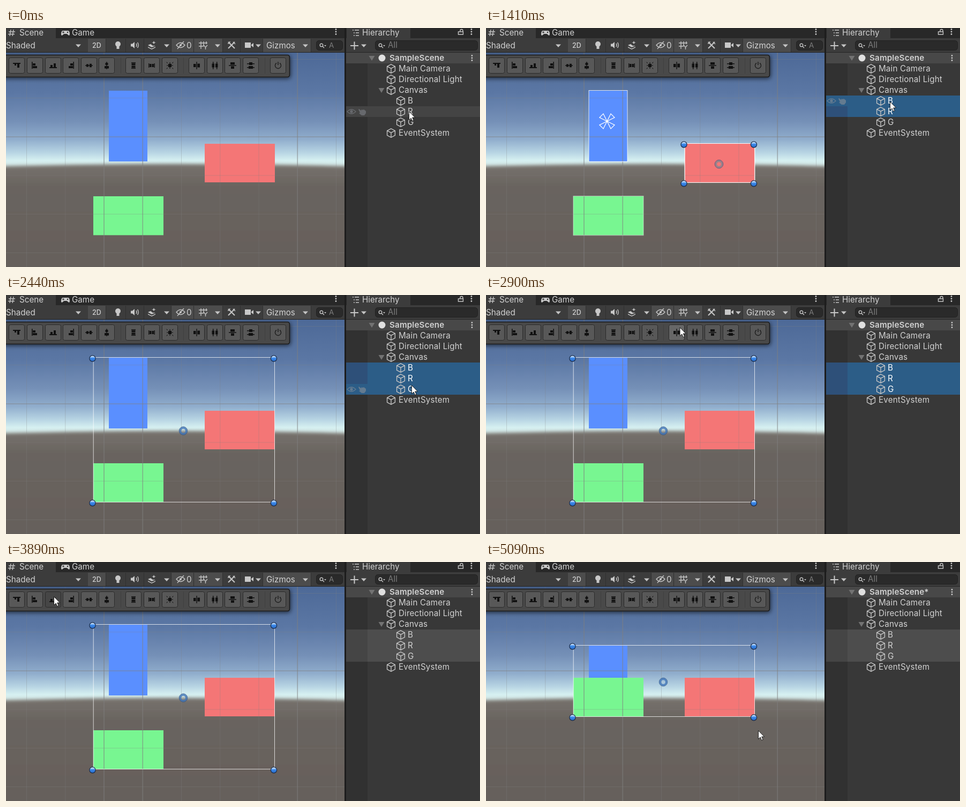
An HTML page for the animation above (5120 ms loop, 885 px wide and 446 px high).

```html
<!DOCTYPE html>
<html lang="en">
<head>
<meta charset="utf-8">
<title>Align objects</title>
<style>
html, body { margin: 0; width: 100%; height: 100%; overflow: hidden; background: #383838; }
svg { display: block; width: 885px; height: 446px; }
text { font: 15.2px Inter, sans-serif; fill: #d2d2d2; white-space: pre; }
.row { letter-spacing: .15px; }
.bold { font-weight: 600; }
.small { font-size: 12.5px; font-weight: 500; }
.dim { fill: #7c7c7c; }
.line { fill: none; stroke: #c4c4c4; stroke-width: 1.4; }
.fill { fill: #c8c8c8; }
</style>
</head>
<body>
<svg id="stage" viewBox="0 0 885 446" xmlns="http://www.w3.org/2000/svg"></svg>
<script>
const LOOP = 5120;
const stage = document.getElementById('stage');

const rect = (x, y, w, h, fill, extra = '') =>
  `<rect x="${x}" y="${y}" width="${w}" height="${h}" fill="${fill}" ${extra}/>`;
const label = (x, y, s, extra = '') => `<text x="${x}" y="${y}" ${extra}>${s}</text>`;
const path = (d, extra = 'class="line"') => `<path d="${d}" ${extra}/>`;
const at = (x, y, body, extra = '') => `<g transform="translate(${x} ${y})" ${extra}>${body}</g>`;
const stops = list => list.map(([o, c]) => `<stop offset="${o}" stop-color="${c}"/>`).join('');

const cube = (x, y) => at(x, y, path('M0-8.2 7.4-4.4V4.4L0 8.2-7.4 4.4V-4.4ZM-7.4-4.4 0-.6 7.4-4.4M0-.6V8.2'));
const arrow = (x, y) => path(`M${x - 5} ${y - 2.5}h10l-5 5.5z`, 'fill="#c4c4c4"');
const foldout = (x, y) => path(`M${x - 5.5} ${y - 4.5}h11l-5.5 9z`, 'fill="#737373"');
const dots = (x, y) => [-4.5, 0, 4.5].map(d => `<circle class="fill" cx="${x}" cy="${y + d}" r="1.4"/>`).join('');
const lens = (x, y) => at(x, y, `<circle class="line" cx="-1" cy="-1" r="2.8"/>` +
  path('M1 1 4 4.2') + path('M4-1h4l-2 2.4z', 'class="fill"'));
const menu = (x, y) => path(`M${x} ${y - 5}h2m2 0h8M${x + 2} ${y}h2m2 0h6M${x + 2} ${y + 5}h2m2 0h6`);

const items = [
  { id: 'B', y: 136, color: '#5a8fff', x: 192, top: 117, w: 72, h: 132, aligned: 156 },
  { id: 'R', y: 156, color: '#f47676', x: 371, top: 216, w: 131, h: 72, aligned: 216 },
  { id: 'G', y: 176, color: '#78f691', x: 163, top: 314, w: 131, h: 72.6, aligned: 216 }
];

function grid() {
  let out = '';
  for (let i = 0; i < 9; i++) {
    const strong = i === 2 || i === 3 || i === 7;
    out += rect(38 + i * 72.25 - (strong ? .3 : 0), 46, strong ? 1.6 : 1, 400, '#808080', `opacity="${strong ? .58 : .3}"`);
  }
  for (let i = 0; i < 6; i++)
    out += rect(0, 58 + i * 72.2, 632, i === 2 ? 1.5 : 1, '#808080', `opacity="${i === 2 ? .55 : .32}"`);
  return out;
}

const tools = [
  [20, 'M-7-5H7v2H-7zM-4-3h3v3h-3zM1-3h4v7h-4z'],
  [54, 'M-6-7h1.6V6h-1.6zM-4-4h5v4h-5zM-4 1h8v4h-8z'],
  [88, 'M-7 3H7v2H-7zM-5-1h4v4h-4zM1-4h4v7h-4z'],
  [121, 'M4.4-7H6V6H4.4zM-1-4h5v4h-5zM-4 1h8v4h-8z'],
  [155, 'M-7-.7H7v1.4H-7zM-5-2.5h4v5h-4zM1-3.2h4v6.4h-4z'],
  [188, 'M-.7-7h1.4V7h-1.4zM-2.5-5h5v4h-5zM-4 1h8v4.5h-8z'],
  [238, 'M-4-6h8v1.4h-8zM-3.5-4h7v3.5h-7zM-3.5.5h7v3.5h-7zM-4 4.6h8V6h-8z'],
  [272, 'M-6-4h1.4v8h-1.4zM-4-3h3.5v6h-3.5zM.5-3h3.5v6h-3.5zM4.6-4H6v8H4.6z'],
  [306, 'M-3-3h6v6h-6zM-7-7l3 2-1 1zM7-7l-3 2 1 1zM-7 7l3-2-1-1zM7 7l-3-2 1-1zM-6-.6h3v1.2h-3zM3-.6h3v1.2h-3zM-.6-6h1.2v3h-1.2zM-.6 3h1.2v3h-1.2z'],
  [356, 'M-.7-7h1.4V7h-1.4zM-6-3h4.5v6h-4.5zM1.5-3.5h4.5v7h-4.5z'],
  [390, 'M-4-7h1.4V7h-1.4zM3-7h1.4V7h-1.4zM-5.5-3.5h4.5v7h-4.5zM1-3.5h4.5v7h-4.5z'],
  [423, 'M-7-.7H7v1.4H-7zM-4-6h8v4.5h-8zM-3 1.5h6v4.5h-6z'],
  [457, 'M-7-4H7v1.4H-7zM-7 3H7v1.4H-7zM-3-6h6v5h-6zM-4 1h8v5h-8z'],
  [508, '']
];

function toolBar() {
  const buttons = tools.map(([x, d]) => at(x, 70,
    rect(-14.5, -14.5, 29, 29, '#585858', 'class="tool" rx="3" stroke="#2b2b2b"') + (d
      ? path(d, 'fill="#111"')
      : path('M-3-4.6A5.5 5.5 0 1 0 3-4.6M0-7V-1', 'fill="none" stroke="#1c1c1c" stroke-width="1.4"'))));
  return rect(-8, 50.5, 537.5, 41, '#484848', 'rx="4" stroke="#1b1b1b" stroke-width="1.6" filter="url(#shadow)"') +
    [214, 331, 483].map(x => rect(x, 55, 1, 30, '#404040')).join('') + buttons.join('');
}

function sceneHeader() {
  const cells = [[153, 33, 1], [187, 36], [224, 33], [258, 50], [309, 41, 1], [351, 53, 1], [405, 32], [438, 41], [480, 89, 1]];
  return rect(0, 0, 633, 19, '#282828') + rect(0, 0, 93, 20, '#3c3c3c') + rect(0, 19, 633, 27, '#3c3c3c') +
    cells.map(([x, w, on]) => rect(x, 20, w, 25, on ? '#4c4c4c' : '#3c3c3c') + rect(x + w, 20, 1, 25, '#303030')).join('') +
    rect(0, 45, 633, 1, '#222') +
    path('M9 3 7 15M14 3 12 15M5 7h12M4 11.5h12') + label(25, 14, 'Scene') +
    at(111, 9, path('M-5-4H5C8-4 9 4 7 5 5 5 4 2 2 2H-2C-4 2-5 5-7 5-9 4-8-4-5-4Z', 'class="fill"') +
      path('M-6-1h4M-4-3v4', 'stroke="#282828"') + `<circle cx="4" cy="-1" r="1.2" fill="#282828"/>`) +
    label(123, 14, 'Game') + dots(616, 7) +
    label(0, 38, 'Shaded') + arrow(135, 33) + label(161, 37, '2D', 'class="small"') +
    at(209, 32, `<circle class="fill" cy="-2" r="5"/>` + path('M-2.5 2h5v5h-5z', 'class="fill"')) +
    at(240, 32, path('M-7-2.5h3L0-6V6L-4 2.5h-3z', 'class="fill"') + path('M3-3Q5 0 3 3M5.5-5Q9 0 5.5 5')) +
    at(272, 32, path('M-7 0-2-2 2 1 7 1 0 4zM-7 3 0 6.5 7 3V4.5L0 8-7 4.5zM4-8l1 2.5 3 .5-3 1-1 2.5-1-2.5-3-1 3-.5z', 'class="fill"')) +
    arrow(300, 33) +
    at(326, 32, path('M-8 0Q0-9 8 0 0 9-8 0ZM-6 7 6-7') + `<circle class="fill" r="2"/>`) + label(337, 38, '0') +
    at(368, 32, path('M-8-4H8M-8 2H1M-4-7V7M1-7V2M6-7V-2') + path('M1 0 4.5 4 8 0M4.5 4v4', 'class="line" stroke-width="2"')) + arrow(395, 33) +
    at(421, 32, path('M-6 6 6-6M-6-6 6 6', 'class="line" style="stroke-width:2.2"') + path('M-7-3Q-3-3-3-7M3-6 7-2')) +
    at(454, 32, path('M-8-5H3V5H-8zM4-1 8-4V4L4 1z', 'class="fill"')) + arrow(471, 33) +
    label(486, 38, 'Gizmos') + arrow(559, 33) +
    rect(579.5, 23.5, 49, 18, '#2a2a2a', 'rx="5" stroke="#212121"') + lens(590, 33) + label(603, 37, 'A', 'class="dim" style="font-size:13.5px"');
}

function hierarchy() {
  return rect(632, 0, 4, 446, '#1d1d1d') + rect(635, 0, 250, 19, '#282828') + rect(636, 0, 119, 20, '#3c3c3c') +
    rect(635, 19, 250, 27, '#3c3c3c') + rect(635, 45, 250, 1, '#252525') +
    menu(647, 9) + label(665, 14, 'Hierarchy') +
    at(849, 8, path('M-4.5-1h9V4h-9zM-1-1V-3A2.5 2.5 0 0 1 4-3V-1')) + dots(869, 7) +
    path('M643 33h15M650.5 25.5v15', 'stroke="#c8c8c8" stroke-width="2"') + arrow(668, 33) +
    rect(689.5, 23.5, 191, 18, '#2a2a2a', 'rx="5" stroke="#212121"') + lens(700, 33) + label(713, 37, 'All', 'class="dim"') +
    rect(635, 46, 250, 400, '#383838') + rect(635, 46, 40, 400, '#313131') + rect(635, 46, 250, 20, '#484848') +
    items.map(o => rect(635, o.y - 10, 250, 20, '#444', `id="row${o.id}"`) + rect(635, o.y - 10, 40, 20, '#2e5079', `id="side${o.id}"`)).join('') +
    `<g id="eye">${path('M637 0Q645-8 653 0 645 8 637 0Z', 'fill="none" stroke="#8a8f96" stroke-width="1.4"')}` +
    `<circle cx="645" r="2.7" fill="#8a8f96"/>` +
    path('M659-5l4 3 1-2 2 1 2-1 4 3v4l-3 4h-5l-5-4 2-1-3-6z', 'fill="#8a8f96"') + '</g>' +
    foldout(683, 56.5) + `<circle cx="702" cy="56" r="6.5" fill="#e0e0e0"/>` +
    label(716, 61, 'SampleScene', 'id="title" class="row bold"') + dots(870, 56) + foldout(701, 116.5) +
    [['Main Camera', 76], ['Directional Light', 96], ['Canvas', 116], ['EventSystem', 196]]
      .map(([s, y]) => cube(719, y) + label(733, y + 5, s, 'class="row"')).join('') +
    items.map(o => cube(737, o.y) + label(750, o.y + 5, o.id, `id="name${o.id}"`)).join('');
}

stage.innerHTML = `<defs>
  <linearGradient id="sky" gradientUnits="userSpaceOnUse" x1="0" y1="46" x2="0" y2="260">${stops([
    [0, '#4d6997'], [.35, '#5b77a4'], [.6, '#7590b7'], [.76, '#91aecd'], [.87, '#b7d4e3'], [.94, '#d6f0f1'], [1, '#d4e6e4']])}</linearGradient>
  <linearGradient id="ground" x1="0" y1="0" x2="0" y2="1">${stops([[0, '#77726d'], [.2, '#69645f'], [1, '#655f5a']])}</linearGradient>
  <linearGradient id="knob" x1="0" y1="0" x2="0" y2="1">${stops([[0, '#e4f1ff'], [.3, '#93c0f5'], [.4, '#3f8cec'], [1, '#2468c8']])}</linearGradient>
  <filter id="soft" x="-5%" y="-10%" width="110%" height="120%"><feGaussianBlur stdDeviation="3"/></filter>
  <filter id="shadow" x="-5%" y="-50%" width="110%" height="200%"><feDropShadow dx="1" dy="2" stdDeviation="4" flood-opacity=".65"/></filter>
  <clipPath id="view"><rect y="46" width="632" height="400"/></clipPath>
</defs>
<g clip-path="url(#view)">
  ${rect(0, 46, 632, 220, 'url(#sky)')}
  ${path('M-20 258.5Q316 249 652 258.5V470H-20Z', 'fill="url(#ground)" filter="url(#soft)"')}
  ${items.map(o => rect(o.x, o.top, o.w, o.h, o.color, `id="box${o.id}"`)).join('')}
  ${grid()}
  <g id="single" fill="none" stroke="#fff">
    ${items.map(o => `<rect x="${o.x}" y="${o.top - .5}" width="${o.w}" height="${o.h + .8}" opacity="${o.id === 'G' ? .5 : .8}"/>`).join('')}
    ${at(226, 174, [[1, 1], [-1, 1], [1, -1], [-1, -1]].map(([a, b]) =>
      path(`M0 0 ${14 * a} ${7 * b} ${7 * a} ${14 * b}Z`, 'stroke-width="1.3"')).join(''))}
  </g>
  <g id="gizmo">
    <rect id="bounds" fill="none" stroke="#fff" stroke-opacity=".75"/>
    <g id="pivot" fill="none"><circle id="ring" r="5.6" stroke-width="3.6" opacity=".8"/><circle r="7.8" stroke="#2d5285" opacity=".7"/></g>
    ${'<circle class="knob" r="5.6" fill="url(#knob)" stroke="#1c2c48" stroke-width="1.2"/>'.repeat(4)}
  </g>
  ${toolBar()}
</g>
${sceneHeader()}${hierarchy()}
<path id="cursor" d="M.5.7V16.4L4.2 13 6.6 18.6 9.1 17.5 6.7 12H11.6Z" fill="#fff" stroke="#111" stroke-width=".9"/>`;

const $ = id => document.getElementById(id);
const knobs = [...document.querySelectorAll('.knob')];
const toolRects = [...document.querySelectorAll('.tool')];
const show = (el, on) => el.setAttribute('display', on ? 'inline' : 'none');
const set = (el, attrs) => { for (const k in attrs) el.setAttribute(k, attrs[k]); };

// start, end, target x, y, optional control point
const moves = [
  [890, 970, 754, 137],
  [1580, 1750, 757, 164],
  [2040, 2150, 757, 168],
  [2600, 3120, 116, 68, 437, 20],
  [3150, 3350, 89, 64],
  [4760, 5090, 508, 314]
];

function pointer(t) {
  let x = 752, y = 155;
  for (const [a, b, tx, ty, cx = (x + tx) / 2, cy = (y + ty) / 2] of moves) {
    if (t < a) break;
    const p = Math.min(1, (t - a) / (b - a)), s = p * p * (3 - 2 * p);
    const mix = (u, c, v) => u * (1 - s) ** 2 + 2 * c * s * (1 - s) + v * s * s;
    x = mix(x, cx, tx);
    y = mix(y, cy, ty);
  }
  return [x, y];
}

const selection = t => t < 560 ? '' : t < 1410 ? 'R' : t < 2310 ? 'BR' : 'BRG';

function drawGizmo(t, aligned) {
  const ids = selection(t - 60);
  show($('gizmo'), ids);
  show($('single'), ids === 'R');
  if (!ids) return;
  const picked = items.filter(o => ids.includes(o.id));
  const topOf = o => aligned ? o.aligned : o.top;
  const x0 = Math.min(...picked.map(o => o.x)), x1 = Math.max(...picked.map(o => o.x + o.w));
  const y0 = Math.min(...picked.map(topOf)), y1 = Math.floor(Math.max(...picked.map(o => topOf(o) + o.h)));
  set($('bounds'), { x: x0 + .2, y: y0 - .5, width: x1 - x0 - .7, height: y1 - y0 + 1 });
  set($('pivot'), { transform: `translate(${(x0 + x1) / 2 - 1.5} ${(y0 + y1) / 2 + 2})` });
  set($('ring'), { stroke: ids === 'R' ? '#85858e' : '#3f74b8' });
  knobs.forEach((k, i) => set(k, { cx: i % 2 ? x1 - 2 : x0 - 1.5, cy: i < 2 ? y0 + 1.5 : y1 + 2.3 }));
}

function draw(t) {
  const [x, y] = pointer(t);
  const ids = selection(t), focused = t < 3890, aligned = t >= 4060;
  let hovered = null;
  for (const o of items) {
    const on = ids.includes(o.id), over = x > 635 && Math.abs(y - o.y) < 10;
    if (over) hovered = o;
    show($('row' + o.id), on || over);
    show($('side' + o.id), on && !over);
    set($('row' + o.id), { fill: !on ? '#444' : focused ? '#2c5d87' : '#4d4d4d' });
    set($('side' + o.id), { fill: focused ? '#2e5079' : '#454545' });
    $('name' + o.id).style.fill = on && focused ? '#fff' : '#d2d2d2';
    set($('box' + o.id), { y: aligned ? o.aligned : o.top });
  }
  show($('eye'), hovered);
  if (hovered) set($('eye'), { transform: `translate(0 ${hovered.y})`, opacity: ids.includes(hovered.id) ? .6 : .5 });
  toolRects.forEach((r, i) => {
    const over = Math.abs(x - tools[i][0]) < 15 && Math.abs(y - 70) < 15;
    set(r, { fill: !over ? '#585858' : focused || aligned ? '#676767' : '#464646' });
  });
  $('title').textContent = aligned ? 'SampleScene*' : 'SampleScene';
  drawGizmo(t, aligned);
  set($('cursor'), { transform: `translate(${x} ${y})` });
}

const begin = performance.now();
function tick() {
  draw((performance.now() - begin) % LOOP);
  requestAnimationFrame(tick);
}
tick();
</script>
</body>
</html>
```
